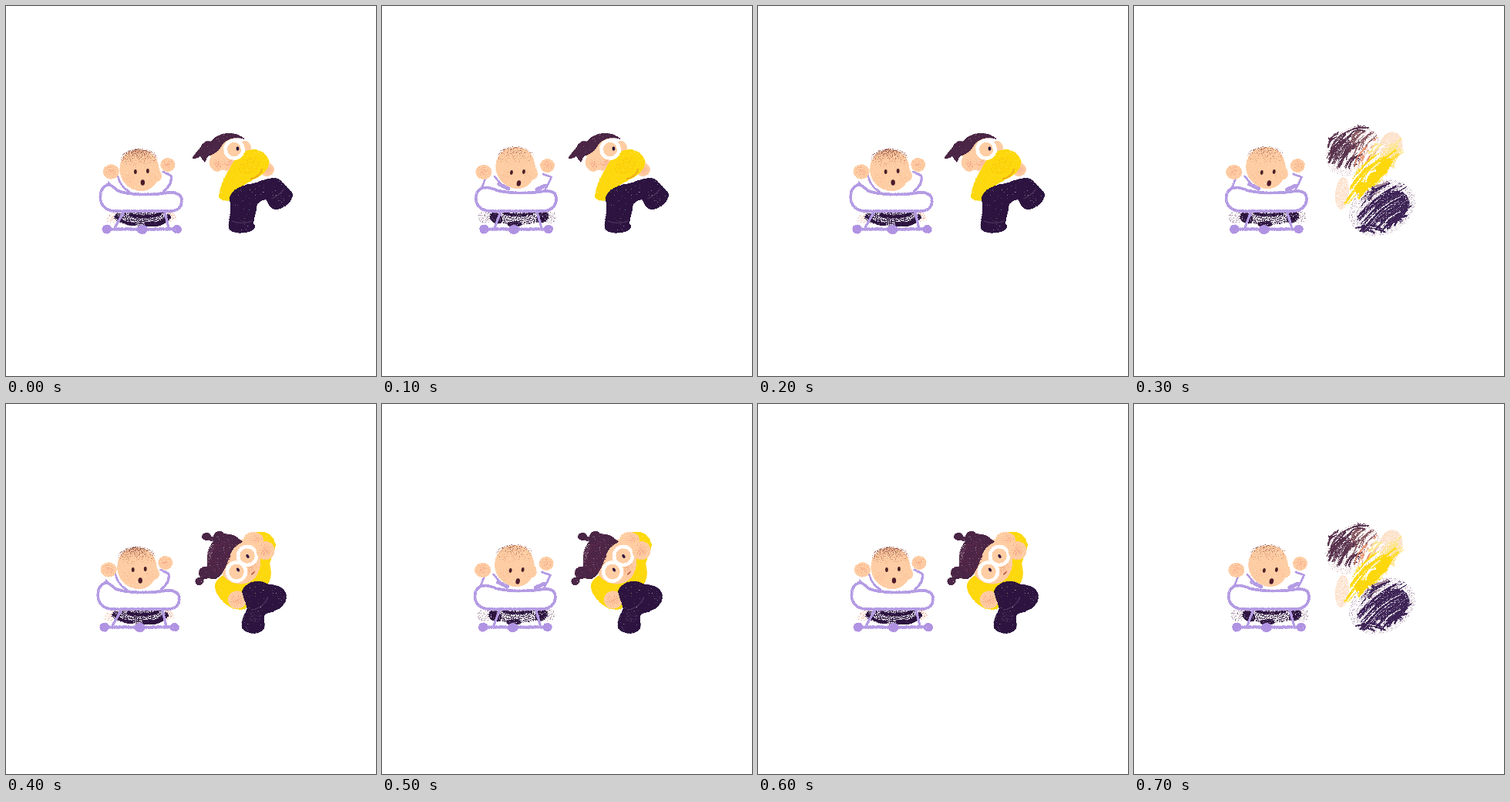
An HTML page for the animation above (0.8 s loop, 480 px wide and 480 px high).

```html
<!DOCTYPE html>
<html lang="en">
<head>
<meta charset="utf-8">
<title>Peekaboo</title>
<style>
  html, body { margin: 0; width: 100%; height: 100%; overflow: hidden; background: #fff; }
  svg { display: block; width: 100%; height: 100%; }
</style>
</head>
<body>
<svg id="stage" viewBox="0 0 480 480">
  <defs>
    <!-- crayon: soft alpha is dithered by fine noise -->
    <filter id="grain" x="-15%" y="-20%" width="130%" height="140%" color-interpolation-filters="sRGB">
      <feGaussianBlur in="SourceGraphic" stdDeviation=".75" result="soft"/>
      <feTurbulence type="fractalNoise" baseFrequency=".73" numOctaves="2" seed="4" result="noise"/>
      <feComposite in="soft" in2="noise" operator="arithmetic" k2="1" k3="-1.7" k4=".9"/>
      <feComponentTransfer result="mask"><feFuncA type="linear" slope="2.6" intercept="-.8"/></feComponentTransfer>
      <feComponentTransfer in="soft" result="solid"><feFuncA type="linear" slope="20"/></feComponentTransfer>
      <feComposite in="solid" in2="mask" operator="in"/>
    </filter>
    <linearGradient id="fuzz" x1="0" y1="0" x2=".15" y2="1">
      <stop offset="0" stop-color="#7b3f3c" stop-opacity=".5"/>
      <stop offset=".55" stop-color="#b56a52" stop-opacity=".24"/>
      <stop offset="1" stop-color="#d98a68" stop-opacity="0"/>
    </linearGradient>
    <radialGradient id="blush">
      <stop offset="0" stop-color="#f3987a" stop-opacity=".4"/>
      <stop offset="1" stop-color="#f3987a" stop-opacity="0"/>
    </radialGradient>
  </defs>
</svg>
<script>
const SKIN = '#fecda3', HAIR = '#4a2545', DARK = '#2d1440', YELLOW = '#fdd80c',
      LILAC = '#b49be4', WHEEL = '#b092e2', ORANGE = '#e8946f', BLUSH = 'url(#blush)';

const grain = (...parts) => `<g filter="url(#grain)">${parts.join('')}</g>`;
const oval = (x, y, rx, ry, fill, turn = 0, alpha = 1) =>
  `<ellipse cx="${x}" cy="${y}" rx="${rx}" ry="${ry}" fill="${fill}" fill-opacity="${alpha}" transform="rotate(${turn} ${x} ${y})"/>`;
const shape = (d, fill, alpha = 1) => `<path d="${d}" fill="${fill}" fill-opacity="${alpha}"/>`;
const line = (d, color, width, alpha = 1) =>
  `<path d="${d}" fill="none" stroke="${color}" stroke-width="${width}" stroke-opacity="${alpha}" stroke-linecap="round" stroke-linejoin="round"/>`;
const ring = (x, y, r, width) =>
  grain(`<circle cx="${x}" cy="${y}" r="${r}" fill="none" stroke="#fff" stroke-width="${width}"/>`);

function random(seed) {
  return () => (seed = (seed * 16807) % 2147483647) / 2147483647;
}

// A sheaf of parallel crayon strokes of varied pressure filling a turned ellipse
function streaks(seed, x, y, length, spread, turn, count, color, width = 2) {
  const rnd = random(seed);
  let out = '';
  for (let i = 0; i < count; i++) {
    const u = rnd() * 2 - 1;
    const half = length * Math.sqrt(1 - u * u) * (.45 + .5 * rnd());
    const slide = (rnd() - .5) * length * .5;
    const v = u * spread, bend = 3 + rnd() * 5;
    out += line(`M${slide - half} ${v}Q${slide} ${v - bend} ${slide + half} ${v}`,
      color, width * (.5 + .8 * rnd()), .4 + .6 * rnd());
  }
  return `<g transform="translate(${x} ${y}) rotate(${turn})">${out}</g>`;
}

const hand = (x, y, rx, ry) => grain(oval(x, y, rx, ry, SKIN)) + grain(oval(x, y, rx, ry, BLUSH));
const tray = d => shape(d, '#fff') + grain(line(d, LILAC, 3.6));

function wheels(xs, legs) {
  const [a, b, c] = xs;
  return grain(
    line(`M${a} 289.5H${c}`, LILAC, 3.8), line(legs, LILAC, 3.2),
    oval(a, 289.5, 6.2, 6, WHEEL), oval(b, 290, 7, 6, WHEEL), oval(c, 289.5, 6, 5.6, WHEEL));
}

// drop lowers the features, hair sets how dense the fuzz is
function babyFace(x, y, turn, drop, hair) {
  return grain(oval(x + 22, y + 8, 6, 8, SKIN),
      shape(`M${x - 26.5} ${y}C${x - 26} ${y - 17} ${x - 15} ${y - 26} ${x} ${y - 26}C${x + 15} ${y - 26} ${x + 25} ${y - 14} ${x + 25} ${y + 2}C${x + 25} ${y + 18} ${x + 14} ${y + 28} ${x + 2} ${y + 28}C${x - 13} ${y + 28} ${x - 26} ${y + 16} ${x - 26.5} ${y}Z`, SKIN)) +
    grain(oval(x - 1, y - 14, 24, 13, 'url(#fuzz)', 0, hair)) +
    grain(oval(x - 14, y + 12, 10, 9, BLUSH, 0, .4), oval(x + 17, y + 11, 8, 8, BLUSH, 0, .4)) +
    oval(x - 6, y + 3 + drop, 1.9, 2.9, '#4a2028', turn) + oval(x + 10, y + 2 + drop, 1.9, 2.9, '#4a2028', turn) +
    oval(x + 3.5, y + 17 + drop, 2.7, 3.8, '#4c1b2b', turn * 2);
}

const babyDown =
  grain(oval(139, 275, 9, 6, ORANGE, -25, .22), oval(212, 273, 10, 6, ORANGE, 20, .22)) +
  grain(oval(177, 274, 37, 12, DARK, 0, .5)) +
  grain(line('M143 273Q153 283 167 283', DARK, 4), line('M162 271Q178 276 200 270', DARK, 4),
    line('M183 283Q202 285 211 274', DARK, 6)) +
  wheels([131, 177, 222], 'M153 267L141 288M206 267L211 288') +
  grain(shape('M133 227L147 242L139 240L130 235Z', LILAC),
    line('M145 220C147 229 151 236 160 241', LILAC, 2.6),
    line('M204 215L214 220C216 227 212 235 205 240', LILAC, 3)) +
  babyFace(174, 212, 0, 0, 1) +
  hand(136.5, 215, 10.5, 9.5) + hand(210, 206, 9.5, 9) +
  tray('M133 232C126 233 122 240 122.500 249C123 260 131 266 142 266H213C223 266 228 261 228 253C228 245 222 241 211 242C190 246 160 245 146 240C141 237 138 232 133 232Z');

const babyUp =
  grain(oval(135, 274, 9, 8, '#8a6a86', 0, .25), oval(218, 274, 9, 8, '#8a6a86', 0, .25)) +
  grain(oval(177, 275, 36, 9, DARK, 0, .4)) +
  grain(oval(149, 275, 9, 7, DARK, 30, .8), oval(173, 283, 10, 4, DARK, 0, .75), oval(209, 274, 9, 7, DARK, -35, .8),
    line('M160 269Q178 274 196 269', DARK, 4, .8)) +
  wheels([133.5, 172, 217], 'M155 267L147 288M202 267L208 288') +
  babyFace(175, 209, 6, 4, .65) +
  grain(line('M136 222L129 239', LILAC, 2.6), line('M147 221L157 233', LILAC, 2.6),
    line('M153 231L165 237', LILAC, 5), line('M202 238L213 233', LILAC, 5),
    line('M210 218L221 222L213 238', LILAC, 2.6)) +
  hand(133, 215.5, 10.5, 9.5) + hand(215.5, 207, 9.5, 9) +
  tray('M136 235.500C127 236 123 241 123 250C123 260 131 266 143 266H210C221 266 227 259 227 250C227 242 221 239.500 213 240C190 244 165 243 150 239C145 237 141 235.500 136 235.500Z');

const adultAway =
  grain(oval(289, 192, 24, 22, SKIN), oval(273, 204, 9, 11, SKIN, -25), oval(310, 184, 8, 9, SKIN)) +
  grain(oval(275, 206, 8, 10, BLUSH), oval(291, 204, 13, 10, BLUSH)) +
  grain(shape('M264 194C261 182 266 171 278 167C290 163 302 165 310 173C301 170 291 171 284 176C280 180 277 188 271 191Z', HAIR),
    shape('M276 181C268 173 257 174 254 181C250 187 244 191 242 198C247 199 249 196 252 195L258 203C260 197 264 193 268 188Z', HAIR)) +
  grain(oval(338, 212, 10, 9, SKIN), oval(340, 213, 8, 8, BLUSH)) +
  grain(shape('M290 212C298 194 309 187 321 186C335 187 343 197 341 206C338 217 326 223 314 229C301 236 297 246 291 252C284 254 276 251 276 246C279 233 282 222 290 212Z', YELLOW)) +
  grain(line('M318 224Q329 222 332 212', '#f0ad16', 2), oval(316, 207, 15, 10, '#f8b90b', -25, .2)) +
  oval(297, 186, 11, 10, SKIN) + ring(296, 186, 11.5, 4.6) +
  oval(300.5, 185, 2, 2.7, DARK) +
  grain(shape('M290 252C291 239 302 234 316 231C333 228 348 217 357 227C363 234 371 239 372 246C371 254 359 264 350 264C342 264 340 254 337 251C329 253 325 256 325 263L321 281C322 289 314 295 302 294C293 293 287 288 289 282C290 271 293 261 290 252Z', DARK),
    oval(306, 287, 17, 7.5, DARK, -3), oval(357, 251, 16, 10, DARK, -35)) +
  grain(line('M293 279Q306 284 319 279', '#4c325b', 1.2), line('M344 250Q354 247 361 237', '#4c325b', 1.2));

const adultFacing =
  grain(shape('M318 169C333 161 348 168 350 184L342 207C346 222 343 233 334 240L310 266C292 271 273 252 271 237C271 226 285 220 300 211Z', YELLOW)) +
  grain(oval(321, 176, 13, 10, SKIN)) +
  grain(shape('M289 184C302 170 322 174 328 190C333 207 329 224 316 231C302 237 286 232 280 219Z', SKIN)) +
  grain(oval(318, 212, 12, 14, BLUSH), oval(325, 175, 10, 7, BLUSH)) +
  grain(shape('M273 171C284 166 298 168 307 179C297 183 292 191 290 199C286 208 283 221 272 227C263 228 256 223 260 214C262 208 260 194 263 187C266 181 270 178 273 171Z', HAIR),
    oval(277, 173, 8, 8, HAIR), oval(260, 172, 6, 5, HAIR), line('M264 174L276 178', HAIR, 6),
    oval(258, 219, 8, 8, HAIR), oval(251, 230, 5.5, 5, HAIR, -30), line('M260 217L253 228', HAIR, 6)) +
  grain(oval(277, 197, 14, 24, '#742d55', 20, .18), oval(264, 190, 4, 18, '#fff', 10, .15)) +
  [[299, 217.5], [313, 197]].map(([x, y]) => oval(x, y, 12, 12, SKIN) + ring(x, y, 12, 4.5)).join('') +
  oval(301, 215, 1.8, 2.7, DARK, -35) + oval(313.5, 197.5, 1.8, 2.7, DARK, -35) +
  line('M319 221L322 218', '#b44d44', 1.6) +
  hand(336.5, 190, 12, 12) + hand(300, 254, 12, 11.5) +
  grain(shape('M306 244C309 232 324 227 336 232C343 236 352 233 358 239C364 247 361 260 351 267C344 272 339 269 335 275L335 288C333 298 310 299 306 290C304 280 311 272 313 265Z', DARK),
    oval(321, 287, 15, 10.5, DARK), oval(349, 252, 14, 16, DARK, 35)) +
  grain(line('M318 267Q332 266 340 251', '#4c325b', 1.2), oval(323, 276, 9, 8, '#6d5478', 0, .17));

const PLUM = '#5a344f', INK = '#3e2356', PEACH = '#fde0c8';
const adultSpin =
  grain(oval(284, 188, 38, 30, '#c9a3ac', -35, .2), oval(322, 262, 45, 34, '#a58aa5', -28, .22)) +
  grain(oval(333, 183, 15, 20, PEACH, 15, .7), oval(270, 243, 9, 21, PEACH, 5, .6)) +
  grain(streaks(71, 272, 189, 25, 23, -52, 34, PLUM), streaks(23, 297, 177, 22, 15, -55, 14, '#8a5a62', 1.8),
    streaks(17, 289, 162, 17, 5, -12, 6, PLUM)) +
  grain(oval(268, 186, 17, 10, PLUM, -45, .55)) +
  grain(streaks(29, 303, 194, 27, 8, -57, 9, ORANGE, 2.2), streaks(8, 312, 190, 24, 9, -55, 8, '#fff', 2.6)) +
  grain(streaks(33, 325, 196, 31, 18, -55, 22, '#fde58f', 2.6)) +
  grain(streaks(55, 307, 220, 42, 15, -46, 28, YELLOW, 2.8), oval(309, 222, 29, 9, YELLOW, -44, .8)) +
  grain(streaks(83, 299, 212, 32, 13, -48, 7, '#fff', 1.8), streaks(12, 314, 240, 28, 5, -42, 9, '#a98a98', 1.8)) +
  grain(streaks(99, 324, 263, 38, 28, -39, 44, INK, 2.2), streaks(5, 309, 290, 22, 5, 8, 6, INK, 2)) +
  grain(oval(334, 261, 25, 19, INK, -38, .75)) +
  grain(streaks(41, 316, 263, 33, 25, -39, 9, '#fff', 1.3));

const stage = document.getElementById('stage');
function layer(markup) {
  const g = document.createElementNS('http://www.w3.org/2000/svg', 'g');
  g.innerHTML = markup;
  stage.append(g);
  return g;
}
const babies = [babyDown, babyUp].map(layer);
const adults = [adultAway, adultSpin, adultFacing].map(layer);
const show = (poses, index) => poses.forEach((p, i) => p.setAttribute('display', i === index ? 'inline' : 'none'));

const STEP = 100, STEPS = 8;
let last = -1;
function draw(time) {
  const step = Math.floor(time / STEP) % STEPS;
  if (step === last) return;
  last = step;
  const phase = (step + .5) / STEPS * 2 * Math.PI;
  const drift = 1.7 * (Math.cos(phase) - 1);
  show(babies, step % 2);
  babies[step % 2].setAttribute('transform', `translate(${drift.toFixed(2)} 0)`);
  show(adults, step % 4 === 3 ? 1 : step < 3 ? 0 : 2);
}

let start;
function tick(now) {
  start ??= now;
  draw(now - start);
  requestAnimationFrame(tick);
}
draw(0);
requestAnimationFrame(tick);
</script>
</body>
</html>
```
